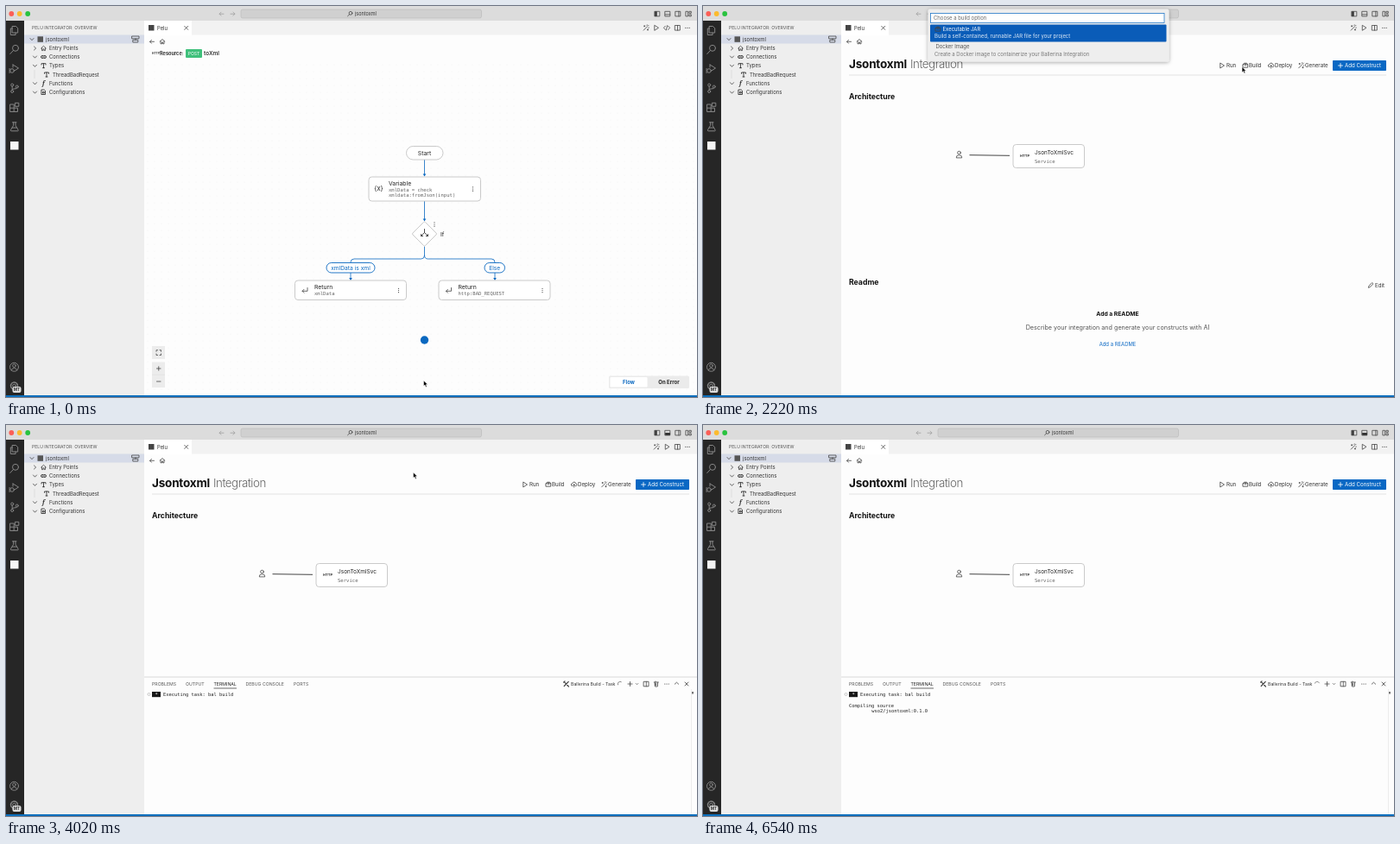
Recreate the animation shown at these times as an HTML page. Size 800 by 453 pixels, loop 6.6 s.

```html
<!DOCTYPE html>
<html lang="en">
<head>
<meta charset="utf-8">
<title>Integration build</title>
<style>
html, body { margin: 0; width: 100%; height: 100%; overflow: hidden; background: #fdfdfd; }
svg { display: block; width: 100vw; height: 100vh; }
text { font: 5.95px Inter, sans-serif; fill: #333; white-space: pre; }
.mono text, text.mono { font: 5.58px "DejaVu Sans Mono", monospace; fill: #666; }
.term text { font: 5.4px "DejaVu Sans Mono", monospace; fill: #222; }
.label text { font-size: 6.85px; fill: #222; }
.act text { font-size: 6.15px; }
.tabs text { font-size: 5.2px; fill: #555; }
.mid { text-anchor: middle; }
.b { font-weight: 700; }
.i { fill: none; stroke: #444; stroke-width: .8; stroke-linecap: round; stroke-linejoin: round; }
.side { stroke: #858585; stroke-width: 1; }
.blue { stroke: #0a68c0; }
.box { fill: #fff; stroke: #c4c4c4; stroke-width: .9; }
</style>
</head>
<body>
<svg viewBox="0 0 800 453">
  <defs>
    <pattern id="grid" width="8" height="8" patternUnits="userSpaceOnUse"><circle cx="4" cy="4" r=".45" fill="#e6e6e6"/></pattern>
    <filter id="shadow" x="-5%" y="-15%" width="110%" height="140%"><feDropShadow dx="0" dy="1" stdDeviation="2" flood-opacity=".35"/></filter>
    <path id="down" d="M-2-1 0 1.2 2-1" class="i"/>
    <g id="dots" fill="#444"><circle cy="-2.2" r=".6"/><circle r=".6"/><circle cy="2.2" r=".6"/></g>
    <g id="wand" class="i"><path d="M-2.8 2.8 1.4-1.4M1-2.8l.2-.6M2.8 0l.6-.2M2.2-2.2l.7-.7M-1.8-2.6v1.2M-2.4-2h1.2M2 1.6v1.2M1.4 2.2h1.2"/></g>
    <path id="play" d="M-1.9-2.8 2.5 0-1.9 2.8Z" class="i"/>
    <path id="split" d="M-2.8-2.8h5.6v5.6h-5.6zM0-2.8v5.6" class="i"/>
    <g id="pack" class="i"><path d="M-2.7-1.2h5.4v3.4h-5.4zM-2.7-1.2l1-1.5h3.4l1 1.5M0-2.7v2.7"/></g>
    <path id="back" d="M2.5 0h-5l2-2m-2 2 2 2" class="i"/>
    <path id="house" d="M-2.9 0 0-2.7 2.9 0M-2-.6v3.2h1.4V.8H.6v1.8H2v-3.2" class="i"/>
    <path id="return" d="M3-3v3.8h-6l2-2m-2 2 2 2" class="i"/>
    <path id="head" d="M-1.8-3h3.6L0 0Z" fill="#0a68c0"/>
  </defs>

  <!-- editor area -->
  <rect width="800" height="453" fill="#fdfdfd"/>
  <rect x="160" y="17" width="640" height="16.5" fill="#f2f2f2"/>
  <rect x="160" y="17" width="55" height="17" fill="#fff"/>
  <rect x="165" y="22" width="6.5" height="6.5" fill="#444"/>
  <text x="175" y="27.6" style="font-size:5.8px">Pelu</text>
  <path d="m206.7 23.4 4 4m0-4-4 4" class="i"/>
  <use href="#back" x="169" y="41.3"/><use href="#house" x="181" y="41.2"/>
  <use href="#split" x="777.5" y="25.3"/>
  <use href="#dots" transform="translate(789 25.3) rotate(90)"/>

  <g id="flow">
    <rect x="160" y="66" width="640" height="385" fill="url(#grid)"/>
    <use href="#wand" x="741" y="25.3"/>
    <use href="#play" x="753" y="25.3" style="stroke:#2fa866"/>
    <path d="m763.4 23.2-2 2.1 2 2.1m3.2-4.2 2 2.1-2 2.1m-1-4.7-1.2 5.2" class="i"/>
    <text x="169" y="56" class="b" style="font-size:3.2px">HTTP</text>
    <text x="178" y="57.1" class="b" style="font-size:5.6px">Resource:</text>
    <rect x="208" y="50" width="19" height="10" rx="1" fill="#3fc07b"/>
    <text x="217.5" y="56.8" class="mid" style="font-size:5.1px;fill:#fff">POST</text>
    <text x="229" y="57.1" style="font-size:6.4px;font-weight:600">toXml</text>

    <g class="i blue">
      <path d="M484.5 178v17M484.5 226v21M484.5 279v10q0 4-4 4h-77.5q-4 0-4 4v19M484.5 289q0 4 4 4h73.500q4 0 4 4v19"/>
    </g>
    <use href="#head" x="484.5" y="197.5"/><use href="#head" x="484.5" y="249.500"/>
    <use href="#head" x="399" y="318"/><use href="#head" x="566" y="318"/>
    <g class="box">
      <rect x="463.500" y="162.500" width="42.500" height="15.500" rx="7.750"/>
      <rect x="420" y="198" width="129.500" height="28" rx="3.500"/>
      <path d="M483.500 250.500q1-1 2 0l12.500 12.500q1 1 0 2l-12.500 12.500q-1 1-2 0l-12.500-12.500q-1-1 0-2z"/>
      <rect x="334.500" y="318" width="129" height="22.500" rx="3.500"/>
      <rect x="501" y="318" width="129" height="22.500" rx="3.500"/>
      <g class="blue">
        <rect x="371" y="297.500" width="56" height="11.500" rx="5.750"/>
        <rect x="554" y="297.500" width="23.500" height="11.500" rx="5.750"/>
      </g>
    </g>
    <use href="#dots" x="540.500" y="212"/><use href="#dots" x="496" y="253"/>
    <use href="#dots" x="454.500" y="329.500"/><use href="#dots" x="621" y="329.500"/>
    <use href="#return" x="346" y="329.500"/><use href="#return" x="512.500" y="329.500"/>
    <path d="M484.500 258.500v4l-4 4m4-4 4 4m-7.900-2v2h2m3.800 0h2v-2" class="i" style="stroke:#222"/>
    <g class="label">
      <text x="484.500" y="172.600" class="mid">Start</text>
      <text x="443" y="207.500">Variable</text>
      <text x="431.500" y="214" class="mid" style="font-size:7.500px">{x}</text>
      <text x="503" y="267">If</text>
      <text x="357" y="328">Return</text>
      <text x="523.500" y="328">Return</text>
      <text x="399" y="305.700" class="mid" style="fill:#0a68c0;font-size:6.700px">xmlData is xml</text>
      <text x="565.700" y="305.700" class="mid" style="fill:#0a68c0;font-size:6.700px">Else</text>
    </g>
    <g class="mono">
      <text x="443" y="214.700">xmlData = check</text>
      <text x="443" y="221.300">xmldata:fromJson(input)</text>
      <text x="357" y="335.300">xmlData</text>
      <text x="523.500" y="335.300">http:BAD_REQUEST</text>
    </g>
    <circle cx="484.500" cy="387" r="4.700" fill="#0a68c0"/>
    <path d="M169 394h15v15h-15zM169 412.500h15v29.500h-15z" fill="#ececec"/>
    <path d="M169 427.300h15" stroke="#ddd" stroke-width=".6"/>
    <path d="M174 400.200v-1.500h1.500m2.500 0h1.500v1.500m0 2.800v1.500H178m-2.500 0H174V403M174.500 420h4.500m-2.250-2.250v4.500M174.500 435h4.500" class="i"/>
    <rect x="698" y="428.500" width="93" height="14.500" rx="1.500" fill="#ebebeb"/>
    <rect x="699.500" y="430" width="43" height="11.500" rx="1" fill="#fff"/>
    <text x="721" y="438" class="b mid" style="fill:#0a68c0;font-size:6px">Flow</text>
    <text x="767.500" y="438" class="b mid" style="font-size:6px;fill:#222">On Error</text>
  </g>

  <g id="later">
    <use href="#wand" x="753" y="25.300"/><use href="#play" x="765.500" y="25.300" style="stroke:#2fa866"/>
  </g>
  <circle id="loader" cx="485.500" cy="253.500" r="1.200" fill="#0a68c0"/>

  <g id="overview">
    <text x="169" y="72" class="b" style="font-size:13.500px;letter-spacing:-.2px;fill:#111">Jsontoxml</text>
    <text x="240" y="72" style="font-size:13.300px;font-weight:300;letter-spacing:-.45px;fill:#666">Integration</text>
    <path d="M169 80h622" stroke="#dcdcdc" stroke-width=".8"/>
    <rect x="729" y="63" width="62" height="12" rx=".8" fill="#0a68c4"/>
    <path d="M735.500 69h5m-2.500-2.500v5" class="i" style="stroke:#fff"/>
    <use href="#play" x="601" y="69"/><use href="#pack" x="628" y="69"/><use href="#wand" x="692.500" y="69"/>
    <path d="M655.800 70.800q-1.700-.3-1.500-1.900.3-1.300 1.600-1.200.5-1.700 2-1.600 1.500.1 1.800 1.700 1.300 0 1.300 1.500-.2 1.400-1.500 1.500M657.700 72v-3.200m-1.200 1.200 1.200-1.200 1.200 1.200" class="i"/>
    <g class="act">
      <text x="606" y="71.200">Run</text><text x="632" y="71.200">Build</text>
      <text x="662" y="71.200">Deploy</text><text x="697" y="71.200">Generate</text>
      <text x="743" y="71.200" style="fill:#fff">Add Construct</text>
      <text x="778" y="325.800">Edit</text>
    </g>
    <path d="m770.500 326 .5-1.800 3.700-3.700 1.300 1.300-3.700 3.700z" class="i"/>
    <text x="169" y="108.200" class="b" style="font-size:8.700px;fill:#111">Architecture</text>
    <circle cx="296.500" cy="170" r="1.800" class="i"/>
    <path d="M293.300 175.500q0-2.500 2-2.500h2.400q2 0 2 2.500z" class="i"/>
    <path d="m308.500 172.700 46.500.6" stroke="#444" stroke-width="1"/>
    <rect x="359" y="160.500" width="82.500" height="27" rx="3.500" class="box"/>
    <text x="367" y="175" class="b" style="font-size:4.100px">HTTP</text>
    <text x="384" y="172.300" style="font-size:6.500px;fill:#222">JsonToXmlSvc</text>
    <text x="384" y="181.600" class="mono">Service</text>
    <text x="169" y="323.200" class="b" style="font-size:8.700px;fill:#111">Readme</text>
    <text x="480" y="358.700" class="b mid" style="font-size:6.750px;fill:#111">Add a README</text>
    <text x="480" y="374.900" class="mid" style="font-size:7.180px;fill:#555">Describe your integration and generate your constructs with AI</text>
    <text x="480" y="393.700" class="mid" style="fill:#0a68c4">Add a README</text>
  </g>

  <g id="panel">
    <rect x="160" y="292" width="640" height="159" fill="#fdfdfd"/>
    <path d="M160 292h640" stroke="#d0d0d0" stroke-width=".8"/>
    <g class="tabs">
      <text x="169" y="302">PROBLEMS</text><text x="208" y="302">OUTPUT</text>
      <text x="240.500" y="302" style="fill:#222">TERMINAL</text>
      <text x="277.500" y="302">DEBUG CONSOLE</text><text x="333" y="302">PORTS</text>
      <text x="654" y="302" style="fill:#333">Ballerina Build - Task</text>
    </g>
    <path d="M240.500 305h26.500" stroke="#444" stroke-width=".8"/>
    <path d="m646 297.300 5 5m-4.800.2 5-5.200m-5.600.8 1.400-1.200m2.800 4.700 1.600 1.400" class="i" style="stroke-width:1.200"/>
    <path id="spin" d="M-2.600-.8A2.700 2.700 0 0 1 2.400-1.200" class="i" style="stroke:#777"/>
    <path d="M720 300h5m-2.500-2.500v5m16-5.200h5.500v5.500h-5.500zm2.750 0v5.500m9-4.800h5m-4.200.2.400 4.800h2.800l.4-4.800m-2.600-.2v-1m-.5 2.500v2m1.200-2v2m21.500-1.300 2.200-2 2.200 2m7.300-2.200 4 4m0-4-4 4" class="i"/>
    <use href="#down" transform="translate(730.500 300) scale(.7)"/>
    <use href="#dots" transform="translate(765 300) rotate(90)"/>
    <path d="M793.500 306v145" stroke="#e4e4e4" stroke-width=".7"/>
    <rect x="794" y="309" width="2" height="2.500" fill="#777"/>
    <circle cx="165.500" cy="312" r="1.500" fill="none" stroke="#aaa" stroke-width=".6"/>
    <rect x="169" y="309" width="10" height="6.200" fill="#181818"/>
    <g class="term">
      <text x="174" y="314.200" class="mid" style="fill:#fff">*</text>
      <text x="182" y="314">Executing task: bal build</text>
      <g id="compile"><text x="169" y="327">Compiling source</text><text x="195.200" y="333.300">wso2/jsontoxml:0.1.0</text></g>
    </g>
  </g>

  <!-- side bars -->
  <rect x="21" y="17" width="139" height="434" fill="#eeeeee"/>
  <rect y="17" width="21" height="434" fill="#262626"/>
  <rect x="21" y="33.500" width="139" height="10" fill="#d6dbe8"/>
  <text x="30" y="27.100" style="font-size:5.080px;fill:#555">PELU INTEGRATOR: OVERVIEW</text>
  <rect x="36.500" y="35.300" width="6.500" height="6.500" fill="#555"/>
  <path d="M146 35h8v2.800h-8zm4 2.800v1.500m-2.800 0h5.600v2.700h-5.600z" class="i"/>
  <g id="tree"></g>
  <use href="#house" x="43.500" y="49"/>
  <path d="M43 57.500h-1a1.500 1.500 0 0 0 0 3h1m1-3h1a1.500 1.500 0 0 1 0 3h-1m-2-1.500h3M41.300 97h3l1.200 1.200v4.300h-4.200zm1.500 2.500h1.500v1.500h-1.500z" class="i" style="stroke:#222"/>
  <path d="M41 68v-1.300h5V68m-2.500-1.300v5m-1 0h2M44.500 78.300v-1.300h5v1.300M47 77v5m-1 0h2" class="i" style="stroke:#222"/>
  <text x="42" y="92" style="font:italic 700 7px 'Noto Serif',serif">f</text>
  <path d="M33 74v10" stroke="#d5d5d5" stroke-width=".6"/>
  <g class="i side">
    <path d="M7.500 23.500h4l2.200 2.200v5.300h-6.200zm0 2.500H5.300v7.500h5.800V31"/>
    <circle cx="11" cy="48.800" r="3.500"/><path d="m8.500 51.500-3.700 4"/>
    <path d="m8 68 6.500 4-5 3.200M8 68v3"/><circle cx="7" cy="75" r="2.300"/><path d="M3.700 73h1m-1 2h1m-1 2h1"/>
    <circle cx="7.200" cy="91.500" r="1.500"/><circle cx="7.200" cy="99" r="1.500"/><circle cx="12.800" cy="93.500" r="1.500"/><path d="M7.200 93v4.500q0-1.500 2-1.500 3.600 0 3.600-1"/>
    <path d="M5 114h4.200v8.500H5zm0 4.200h8.500v4.300H9.200M10.800 112.300h4v4h-4z"/>
    <path d="M7.500 134.800h4.500m-3.400 0v3.500l-3.200 5.500q-.2 1 .7 1h7.400q.9 0 .7-1L11 138.300v-3.500M7.200 141h5.200"/>
    <circle cx="9.500" cy="418.300" r="5"/><circle cx="9.500" cy="416.700" r="1.800"/><path d="M6.300 422q.5-2.500 3.200-2.500t3.200 2.500"/>
    <circle cx="9.500" cy="440" r="4" stroke-width="1.500" stroke-dasharray="1.900 1.200"/><circle cx="9.500" cy="440" r="1.800"/>
  </g>
  <rect x="5" y="157" width="9.500" height="9.500" fill="#f5f5f5"/>
  <rect x="7.500" y="441" width="10" height="7" rx="2" fill="#dedede"/>
  <text x="12.500" y="446.300" class="b mid" style="font-size:4.600px">MT</text>
  <rect y="451" width="800" height="2" fill="#0a6ebd"/>

  <!-- title bar -->
  <rect width="800" height="17" fill="#dcdcdc"/>
  <circle cx="6.300" cy="9" r="2.900" fill="#fb5f57"/><circle cx="15.700" cy="9" r="2.900" fill="#fcbb2e"/><circle cx="25.200" cy="9" r="2.900" fill="#29c33f"/>
  <rect x="272" y="4" width="278.500" height="10" rx="2" fill="#d0d0d0" stroke="#b9b9b9" stroke-width=".6"/>
  <g opacity=".4"><use href="#back" x="249.500" y="9.200"/><use href="#back" transform="translate(262.500 9.200) scale(-1 1)"/></g>
  <circle cx="399" cy="8.300" r="1.900" class="i"/><path d="m397.600 9.700-2 2" class="i"/>
  <text x="404" y="11.200" style="font-size:5.500px">jsontoxml</text>
  <path d="M751.200 6.300h5.600v5.600h-5.600zM763.200 6.300h5.600v5.600h-5.600zm0 3.500h5.600M775.200 6.300h5.600v5.600h-5.600zm3.600 0v5.600M787.300 6.300h2.300v5.600h-2.300zm4 0h2v2h-2zm0 3.600h2v2h-2z" class="i"/>
  <path d="M751.200 6.300h2.500v5.600h-2.500z" fill="#333"/>
  <path id="panelOn" d="M763.200 9h5.600v2.900h-5.600z" fill="#333"/>

  <g id="picker">
    <rect x="260.500" y="3.500" width="279" height="61" rx="2.500" fill="#eeeeee" filter="url(#shadow)"/>
    <rect x="263.500" y="8.500" width="270.500" height="11" fill="#fff" stroke="#2478c8" stroke-width=".8"/>
    <text x="267" y="16.200" style="fill:#666">Choose a build option</text>
    <rect x="263" y="21.500" width="273.500" height="20" rx="1" fill="#0a5cb8"/>
    <use href="#pack" x="272" y="27" style="stroke:#fff"/>
    <text x="277.500" y="29.100" style="fill:#fff">Executable JAR</text>
    <text x="268" y="37.200" style="fill:#e3edf8">Build a self-contained, runnable JAR file for your project</text>
    <text x="269.500" y="49.200" style="fill:#555">Docker Image</text>
    <text x="268" y="57.800" style="fill:#777">Create a Docker image to containerize your Ballerina Integration</text>
  </g>

  <g id="cursor" stroke-linejoin="round">
    <path id="arrow" d="M0 0v6.300l1.500-1.300 1 2.400 1.200-.5-1-2.300h2z" fill="#000" stroke="#fff" stroke-width=".5"/>
    <path id="hand" d="M0 .6q.7-1 1.300 0v2.600q.7-.5 1.200.2.700-.5 1.200.2.900-.2 1.100.6v1.700L4 8.200H.8L-1.600 5.300q-.2-1 .7-.8l.9.800z" fill="#fff" stroke="#111" stroke-width=".7"/>
  </g>
</svg>
<script>
const $ = id => document.getElementById(id);
const LOOP = 6600, STEP = 60;

const rows = [
  ['jsontoxml', 46, 38.500, 30], ['Entry Points', 50, 49, 33.500, -90], ['Connections', 50, 59, 33.500],
  ['Types', 50, 69.200, 33.500], ['ThreadBadRequest', 54, 79.400], ['Functions', 50, 89.700, 33.500],
  ['Configurations', 50, 100, 33.500]
];
$('tree').innerHTML = rows.map(([label, x, y, mark, turn = 0]) =>
  `<text x="${x}" y="${y + 2.100}">${label}</text>` +
  (mark ? `<use href="#down" transform="translate(${mark} ${y}) rotate(${turn})"/>` : '')).join('');

// Cursor stops: time, x, y
const path = [
  [0, 483.500, 434], [60, 483.500, 434], [600, 149, 39], [840, 149, 39], [1560, 636, 73], [2160, 636, 73],
  [2580, 420.500, 30], [3000, 420.500, 30], [3480, 471.500, 55], [4260, 471.500, 55], [4680, 500, -12]
];
const spans = {
  flow: [0, 720], later: [720, LOOP], loader: [720, 1080], overview: [1080, LOOP],
  picker: [2160, 2940], panel: [3060, LOOP], panelOn: [3060, LOOP], compile: [5040, LOOP]
};
const handTimes = [[600, 900], [1500, 2220], [2460, 2940]];

const within = (t, [from, to]) => t >= from && t < to;
const show = (id, on) => $(id).style.display = on ? '' : 'none';

function cursorAt(t) {
  const next = path.findIndex(p => p[0] > t);
  if (next < 0) return path.at(-1).slice(1);
  const [t0, x0, y0] = path[next - 1], [t1, x1, y1] = path[next];
  const u = (t - t0) / (t1 - t0), k = u * u * (3 - 2 * u);
  return [x0 + (x1 - x0) * k, y0 + (y1 - y0) * k];
}

function draw(now) {
  const t = Math.floor(now % LOOP / STEP) * STEP;
  for (const id in spans) show(id, within(t, spans[id]));
  const hand = handTimes.some(s => within(t, s));
  show('hand', hand);
  show('arrow', !hand);
  $('cursor').setAttribute('transform', `translate(${cursorAt(t)})`);
  $('spin').setAttribute('transform', `translate(711 300) rotate(${(t - 5340) * .3})`);
}

const start = performance.now();
function tick() {
  draw(performance.now() - start);
  requestAnimationFrame(tick);
}
tick();
</script>
</body>
</html>
```
